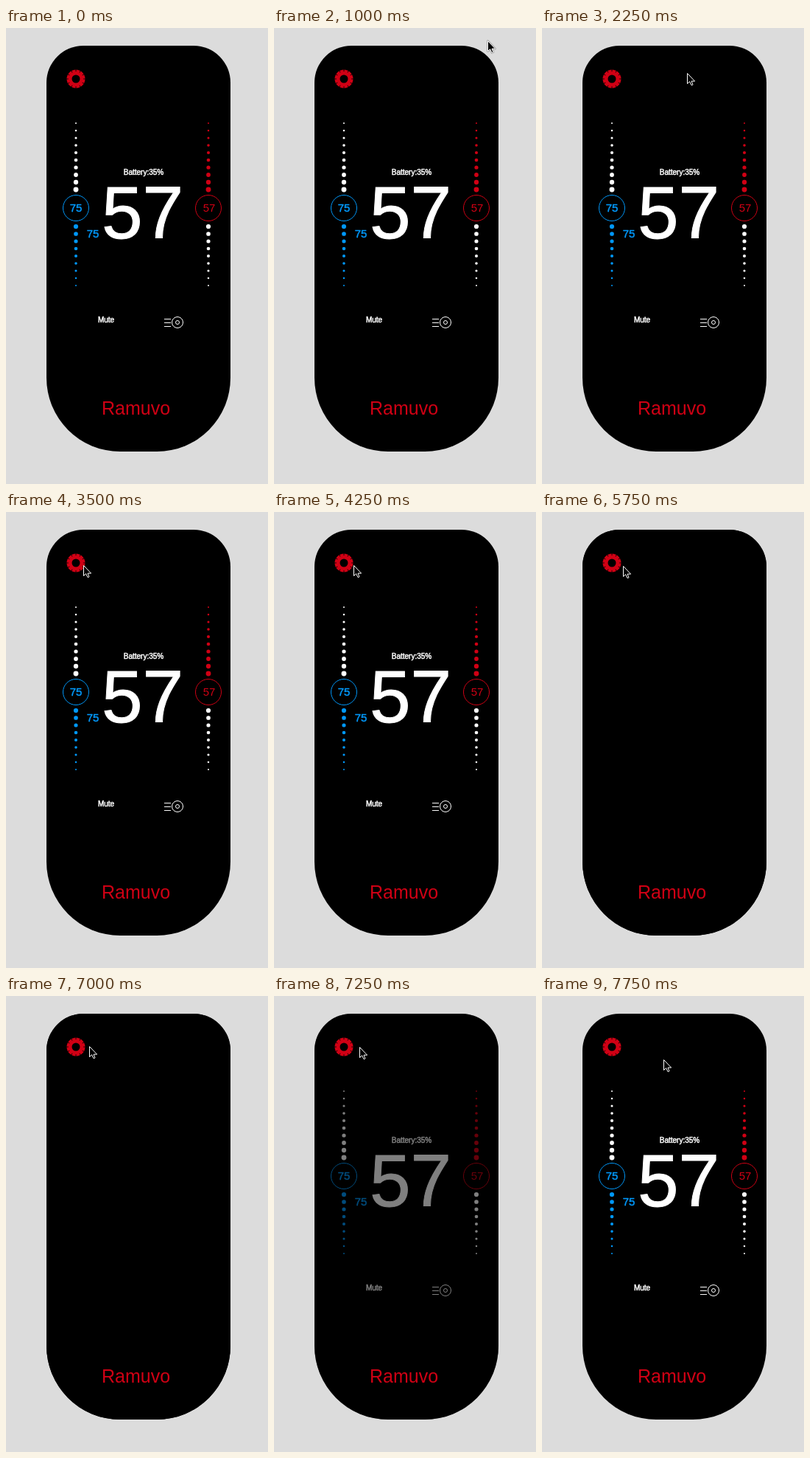
An HTML page that plays this animation: 356x618 px, repeating every 8 s.

```html
<!DOCTYPE html>
<html lang="en">
<head>
<meta charset="utf-8">
<title>Remote</title>
<style>
  html, body { margin: 0; width: 100%; height: 100%; overflow: hidden; background: #dcdcdc; }
  svg { display: block; }
  text { font-family: "Liberation Sans", Arial, sans-serif; text-anchor: middle; }
  .white { fill: #fff; }
  .red { fill: #d00014; }
  .blue { fill: #0098fa; }
  .bold { stroke-width: .5; }
  .white.bold { stroke: #fff; }
  .blue.bold { stroke: #0098fa; }
  .line { fill: none; stroke-width: 1; }
</style>
</head>
<body>
<svg width="356" height="618" viewBox="0 0 356 618">
  <defs>
    <path id="body" d="M105 24H255A50 50 0 0 1 305 74V474A100 100 0 0 1 205 574H155A100 100 0 0 1 55 474V74A50 50 0 0 1 105 24Z"/>
    <path id="arrow" d="M.5 .5V14.5L3.6 11.6 6.1 16.6 8 15.8 6 11.1H10.6Z"/>
  </defs>
  <use href="#body"/>

  <g id="dots"></g>
  <circle class="line" cx="95" cy="244" r="17.5" stroke="#0098fa"/>
  <circle class="line" cx="275" cy="244" r="17.5" stroke="#d00014"/>
  <text class="blue bold" x="95" y="249" font-size="15">75</text>
  <text class="red" x="276" y="249" font-size="15">57</text>
  <text class="blue bold" x="118" y="284" font-size="15">75</text>
  <text class="white bold" x="187" y="199" font-size="10">Battery:35%</text>
  <text class="white" x="185.5" y="285" font-size="100" stroke="#fff">57</text>
  <text class="white bold" x="136" y="399" font-size="10">Mute</text>
  <g class="line" stroke="#fff">
    <path d="M215 394.5H224M215 399.5H224M215 404.5H224"/>
    <circle cx="233" cy="399" r="7.5"/>
    <circle cx="233" cy="399" r="2.5"/>
  </g>

  <!-- covers the controls while the remote is off -->
  <use id="cover" href="#body"/>

  <g id="gear" transform="translate(95 69)">
    <circle class="line" r="9" stroke="#d00014" style="stroke-width:7"/>
  </g>
  <text class="red" x="176.5" y="524" font-size="25">Ramuvo</text>

  <g id="cursor" stroke-linejoin="round">
    <use href="#arrow" fill="none" stroke="#000" stroke-opacity=".25" stroke-width="2.6"/>
    <use href="#arrow" fill="#000" stroke="#fff"/>
  </g>
</svg>
<script>
  const LOOP = 8000, STEP = 250, ENTER = 1000, OFF = 5750, ON = 7000, FADE = 500;
  const $ = id => document.getElementById(id);

  function add(parent, tag, attrs) {
    const el = document.createElementNS("http://www.w3.org/2000/svg", tag);
    for (const key in attrs) el.setAttribute(key, attrs[key]);
    parent.append(el);
  }

  function column(cx, above, below) {
    for (let i = 0; i < 10; i++)
      add($("dots"), "circle", { cx, cy: 129 + 10 * i, r: 1 + .27 * i, class: above });
    for (let i = 0; i < 9; i++)
      add($("dots"), "circle", { cx, cy: 269 + 10 * i, r: 3.1 - .26 * i, class: below });
  }
  column(95, "white", "blue");
  column(275, "red", "white");

  for (let i = 0; i < 12; i++)
    add($("gear"), "path", { d: "M0 -13V-10", stroke: "#000", "stroke-width": .8, transform: `rotate(${30 * i})` });

  // turning points of the pointer: time, x, y
  const turns = [
    [1250, 290, 17], [1750, 224, 67], [2250, 197, 61], [2750, 81, 67],
    [3250, 131, 72], [3500, 105, 72], [5000, 111, 72], [5500, 96, 71],
    [5750, 110, 73], [6250, 126, 75], [7000, 113, 68], [7500, 118, 70],
    [7750, 165, 86]
  ];

  const clamp = v => Math.min(1, Math.max(0, v));

  function pointerAt(t) {
    const next = Math.max(1, turns.findIndex(turn => turn[0] >= t));
    const [t0, x0, y0] = turns[next - 1], [t1, x1, y1] = turns[next];
    const k = clamp((t - t0) / (t1 - t0));
    return [x0 + (x1 - x0) * k, y0 + (y1 - y0) * k].map(Math.round);
  }

  function draw(now) {
    // the screen refreshes in coarse steps
    const t = Math.floor(now % LOOP / STEP) * STEP;
    $("cursor").setAttribute("visibility", t < ENTER ? "hidden" : "visible");
    $("cursor").setAttribute("transform", `translate(${pointerAt(t)})`);
    $("cover").setAttribute("opacity", t < OFF ? 0 : clamp(1 - (t - ON) / FADE));
  }

  let start;
  function tick(now) {
    start ??= now;
    draw(now - start);
    requestAnimationFrame(tick);
  }
  draw(0);
  requestAnimationFrame(tick);
</script>
</body>
</html>
```
